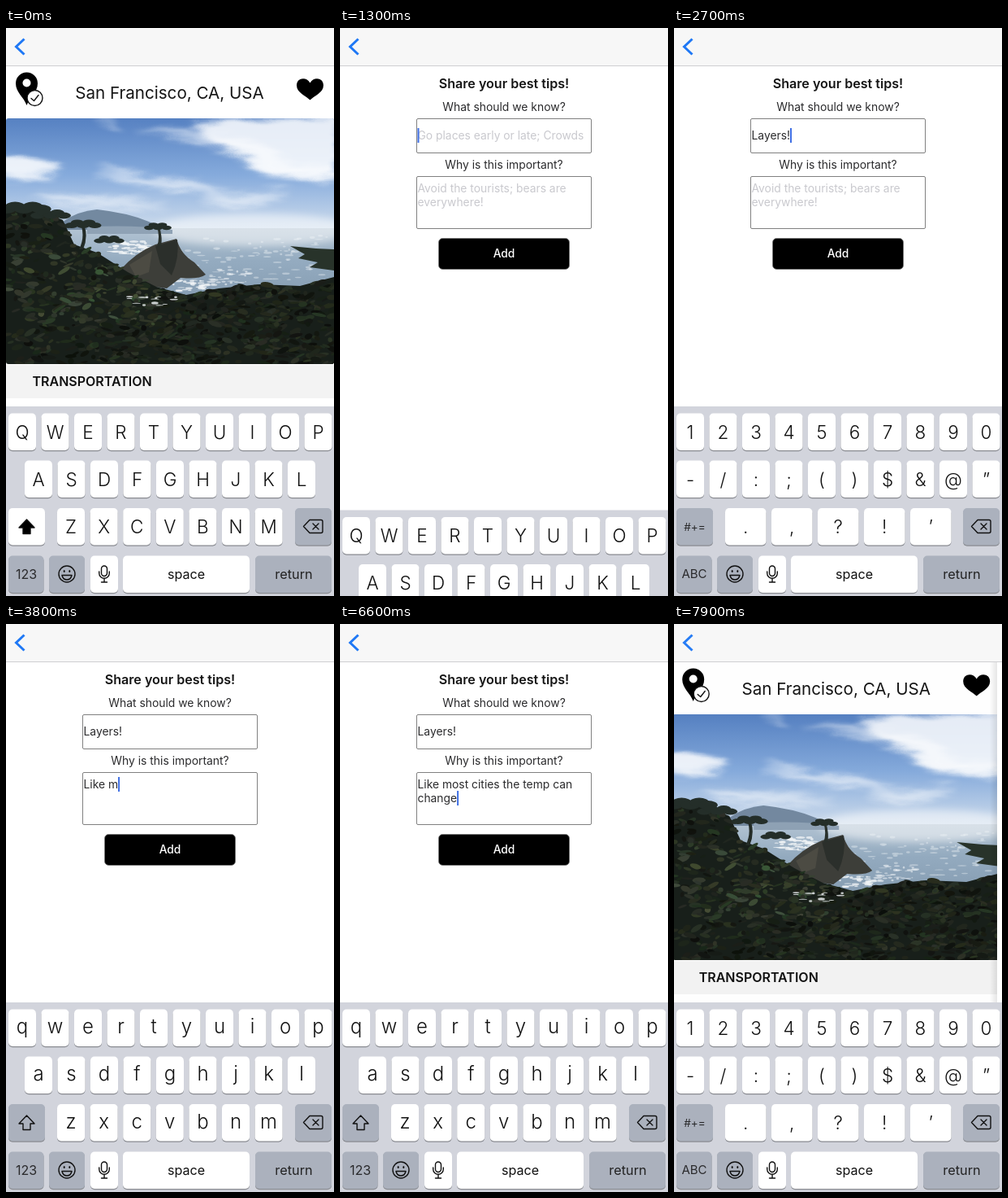
An HTML page for the animation above (8 s loop, 404 by 698 pixels).

```html
<!DOCTYPE html>
<html lang="en">
<head>
<meta charset="utf-8">
<title>Travel tips</title>
<style>
html, body { margin: 0; width: 100%; height: 100%; overflow: hidden; background: #fff; }
svg { display: block; }
text { font-family: Inter, Roboto, sans-serif; fill: #2b2b2d; white-space: pre; }
.mid { text-anchor: middle; }
.hint { fill: #c9c9ce; }
.key { fill: #111; font-weight: 300; }
.line { fill: none; stroke: #111; stroke-width: 1.4; stroke-linecap: round; stroke-linejoin: round; }
</style>
</head>
<body>
<svg id="stage" width="404" height="698" viewBox="0 0 404 698"></svg>
<script>
const LOOP = 8000;
const stage = document.getElementById('stage');

// ---------- drawing helpers ----------
const esc = s => s.replace(/&/g, '&amp;').replace(/</g, '&lt;');
const label = (x, y, size, s, attrs = '') =>
  `<text x="${x}" y="${y}" font-size="${size}" ${attrs}>${esc(s)}</text>`;
const centered = (x, y, size, s, attrs = '') => label(x, y, size, s, `text-anchor="middle" ${attrs}`);
const box = (x, y, w, h, fill, attrs = '') =>
  `<rect x="${x}" y="${y}" width="${w}" height="${h}" fill="${fill}" ${attrs}/>`;
const path = (d, fill, attrs = '') => `<path d="${d}" fill="${fill}" ${attrs}/>`;
const oval = (x, y, rx, ry, fill, attrs = '') =>
  `<ellipse cx="${x}" cy="${y}" rx="${rx}" ry="${ry}" fill="${fill}" ${attrs}/>`;
const gradient = (id, stops, attrs = 'x2="0" y2="1"') =>
  `<linearGradient id="${id}" ${attrs}>` + stops.map(([at, color, alpha = 1]) =>
    `<stop offset="${at}" stop-color="${color}" stop-opacity="${alpha}"/>`).join('') + '</linearGradient>';
const heart = (x, y, scale, attrs) =>
  `<path transform="translate(${x} ${y}) scale(${scale})" ${attrs}
    d="M0 13C-5 8-16.5 4-16.5-5C-16.5-15-4-16 0-8C4-16 16.5-15 16.5-5C16.5 4 5 8 0 13Z"/>`;

let seed = 11;
const random = () => (seed = (seed * 16807) % 2147483647) / 2147483647;
const between = (a, b) => a + (b - a) * random();

// ---------- coastal photo ----------
const ridge = [[0, 222], [42, 224], [70, 236], [84, 266], [112, 276], [150, 300],
  [185, 318], [222, 328], [262, 320], [312, 315], [362, 317], [404, 306]];

function ridgeY(x) {
  const i = Math.max(1, ridge.findIndex(p => p[0] >= x));
  const [a, b] = [ridge[i - 1], ridge[i]];
  return a[1] + (b[1] - a[1]) * (x - a[0]) / (b[0] - a[0]);
}

function foliage() {
  let out = '';
  for (let i = 0; i < 950; i++) {
    const x = between(0, 404), top = ridgeY(x);
    const y = top + random() * (413 - top);
    const sunny = x < 190 && y > 270 && y < 365 ? 10 : 0;
    const light = between(5, 18) + sunny * random();
    out += oval(x.toFixed(1), y.toFixed(1), between(2, 9).toFixed(1), between(1, 3.6).toFixed(1),
      `hsl(${between(75, 120) | 0} ${between(8, 24) | 0}% ${light.toFixed(1)}%)`,
      `transform="rotate(${between(-35, 25) | 0} ${x.toFixed(1)} ${y.toFixed(1)})"`);
  }
  return out;
}

function spray(n, x0, y0, x1, y1, alpha = .8) {
  let out = '';
  for (let i = 0; i < n; i++)
    out += oval(between(x0, x1), between(y0, y1), between(1, 6), between(.5, 1.6), '#f0f4f7', `opacity="${alpha}"`);
  return out;
}

const canopy = (x, y, w) => [0, 1, 2, 3, 4].map(i =>
  oval(x + (i - 2) * w / 5, y + (i % 2 ? -2 : 1.5), w / 4.5, w / 10, '#242e29')).join('');

const photo = () => `<g clip-path="url(#photoClip)">
  ${box(0, 111, 404, 140, 'url(#sky)')}
  <g fill="#fff" filter="url(#wisps)">
    <path d="M225 118C265 108 340 108 410 105V180C385 194 350 194 322 180C290 164 255 140 225 118Z" opacity=".85"/>
    <path d="M150 126Q250 118 320 150Q370 178 410 170V186Q350 192 295 162Q230 135 150 126Z" opacity=".55"/>
    <path d="M-10 157Q35 152 66 172Q60 184-10 183Z" opacity=".85"/>
    <path d="M105 174Q150 178 185 184Q235 190 275 203Q230 208 190 196Q140 190 105 174Z" opacity=".65"/>
    <path d="M30 208Q120 204 205 215Q120 224 60 218Z" opacity=".6"/>
    <path d="M240 212Q300 196 345 204Q320 220 260 220Z" opacity=".55"/>
    <path d="M110 113Q130 112 140 122Q125 124 110 113Z" opacity=".5"/>
  </g>
  ${box(0, 246, 404, 100, 'url(#sea)')}
  ${oval(305, 248, 125, 20, '#fff', 'opacity=".5" filter="url(#soft)"')}
  ${path('M70 238Q88 225 112 223Q150 227 176 238L198 248H70Z', '#7389a0')}
  ${path('M100 245Q150 241 205 248V253H100Z', '#8fa2b5')}
  ${spray(60, 128, 262, 176, 278)}${spray(35, 225, 297, 300, 316, .6)}${spray(90, 205, 255, 400, 310, .4)}
  ${spray(30, 205, 308, 250, 324)}
  ${path('M142 296Q160 276 184 266L210 259Q215 278 232 288L246 303Q238 309 215 307L198 320L150 314Z', '#3d3e39')}
  ${path('M184 268L211 260Q214 282 204 304L190 290Z', '#2b2f2b')}
  ${path('M152 291L180 274L176 300L160 306Z', '#4c4b43')}
  ${path('M186 268Q190 258 186 244L189 244Q193 258 191 268Z', '#29302b')}${canopy(187, 244, 27)}
  ${path('M' + ridge.map(p => p.join(' ')).join('L') + 'V413H0Z', '#181f1a')}
  ${foliage()}
  ${canopy(22, 221, 54)}${canopy(55, 229, 40)}
  ${path('M90 272Q97 258 93 244L97 244Q101 258 95 272Z', '#232b26')}${canopy(95, 241, 36)}${canopy(127, 260, 30)}
  ${spray(14, 150, 328, 210, 342)}
  ${path('M404 272L382 271L350 268L368 278L360 283L384 288L374 294L404 298Z', '#28332a')}
</g>`;

// ---------- pages ----------
const section = (y, s) => box(0, y, 404, 41, '#f3f3f3') +
  label(32.5, y + 26, 16, s, 'font-weight="600" style="fill:#111"');
const button = (x, y, w, s, fill) =>
  box(x, y, w, 38, fill, 'rx="5" stroke="#777" stroke-width=".8"') +
  centered(x + w / 2, y + 23.5, 13.8, s, 'font-weight="500" style="fill:#fff"');

const cityPage = () => `<g id="city">
  ${box(0, 47, 404, 600, '#fff')}
  ${path('M25.5 95C22 85 12 79 12 68A13.5 13.5 0 0 1 39 68C39 79 29 85 25.5 95Z', '#000')}
  ${oval(25.5, 67.5, 5, 5, '#fff')}
  ${oval(35.5, 86, 9.5, 9.5, '#fff', 'stroke="#111" stroke-width="1.4"')}
  <path class="line" d="M31 86.5L34.5 89.5L40 82.5"/>
  ${centered(201.5, 87, 20.6, 'San Francisco, CA, USA', 'style="fill:#161616"')}
  ${heart(374.5, 75.5, 1, 'fill="#000"')}
  ${photo()}
  ${section(414, 'TRANSPORTATION')}
  ${label(35, 476.5, 13.8, 'Great transportation!')}
  ${section(490, 'WHAT TO DO')}${section(531, 'GENERAL RECOMMENDATIONS')}
  ${button(24, 582.5, 172, 'Add To Do', '#000')}${button(207, 582.5, 172, 'Add Recommendation', '#4d4d4d')}
  <rect id="dim" y="47" width="404" height="600"/>
</g>`;

const field = (y, h) => box(94.5, y, 215, h, '#fff', 'rx="1.5" stroke="#808080"');
const formPage = () => `<g id="form">
  <rect id="edge" x="-9" y="47" width="9" height="600" fill="url(#edgeFade)"/>
  ${box(0, 47, 404, 600, '#fff')}
  ${centered(202, 73.5, 16.1, 'Share your best tips!', 'font-weight="600" style="fill:#151515"')}
  ${centered(202, 102, 13.9, 'What should we know?')}
  ${field(111.5, 42)}
  ${centered(202, 173, 13.9, 'Why is this important?')}
  ${field(182.5, 64)}
  <g id="hint0">${label(95.5, 137, 13.85, 'Go places early or late; Crowds', 'class="hint"')}</g>
  <g id="hint1">${label(95.5, 202, 13.85, 'Avoid the tourists; bears are', 'class="hint"')}
    ${label(95.5, 219, 13.85, 'everywhere!', 'class="hint"')}</g>
  ${[137, 202, 219].map((y, i) => label(95.5, y, 13.85, '', `id="row${i}"`)).join('')}
  <rect id="caret" width="2" height="18" fill="#3f6fe4"/>
  ${button(121.5, 258.5, 161, 'Add', '#000')}
</g>`;

const bars = () => `
  ${box(0, 0, 404, 47, '#f7f7f7')}${box(0, 46, 404, 1, '#cfcfd2')}
  <path id="back" d="M22.5 13.5L12.5 23L22.5 32.5" fill="none" stroke="#1f78f5" stroke-width="3"/>
  ${box(0, 645, 404, 53, '#f8f8f8')}${box(0, 645, 404, 1, '#c6c6c8')}
  <path d="M57 667L67 657L77 667M59.5 666V677.5H64.5V670H69.5V677.5H74.5V666M73.5 662V658H71.5" fill="none" stroke="#929292" stroke-width="1.3"/>
  ${oval(202, 663, 4.8, 6, '#2f7bf0')}
  ${path('M193.5 676Q193 672.5 199 670.5V666H205V670.5Q211 672.5 210.5 676Z', '#2f7bf0')}
  ${heart(336.5, 668, .72, 'fill="none" stroke="#999" stroke-width="1.5"')}
  ${centered(67, 695, 9.7, 'Main', 'style="fill:#909090"')}
  ${centered(202, 695, 9.7, 'Profile', 'style="fill:#2f7bf0"')}
  ${centered(337, 695, 9.7, 'Bucket List', 'style="fill:#909090"')}`;

// ---------- keyboard ----------
const GREY = '#abb1bd';
const keys = {};
const cap = (x, y, w, fill = '#fff') =>
  box(x, y + 1.3, w, 45.5, '#898b91', 'rx="5"') + box(x, y, w, 45.5, fill, 'rx="5"');

function keyRow(chars, x, y, pitch = 40.5, w = 34) {
  return [...chars].map((c, i) => {
    const kx = x + i * pitch;
    keys[c] = { x: kx, y, w };
    const lower = /[a-z]/.test(c);
    return cap(kx, y, w) + centered(kx + w / 2, y + (lower ? 29.5 : 31), lower ? 24 : 22.5, c, 'class="key"');
  }).join('');
}

const shiftKey = up => cap(3, 590, 45, up ? '#fff' : GREY) +
  `<path class="line" d="M25.5 604L35 614H30V621.5H21V614H16Z" ${up ? 'style="fill:#000"' : ''}/>`;

function layoutKeys(name) {
  if (name === 'symbols') return keyRow('1234567890', 3, 473.5) + keyRow('-/:;()$&@”', 3, 531.5) +
    cap(3, 590, 45, GREY) + centered(25.5, 618, 13.5, '#+=') + keyRow('.,?!’', 63, 590, 57, 50.5) +
    centered(25, 676, 15, 'ABC');
  const letters = ['qwertyuiop', 'asdfghjkl', 'zxcvbnm'].map(r => name === 'upper' ? r.toUpperCase() : r);
  return keyRow(letters[0], 3, 473.5) + keyRow(letters[1], 23, 531.5) + shiftKey(name === 'upper') +
    keyRow(letters[2], 63, 590, 40.6) + centered(25, 677, 16, '123');
}

const LAYOUTS = ['upper', 'lower', 'symbols'];
const keyboard = () => `<g id="keyboard">
  ${box(0, 465, 404, 233, '#d2d4dc')}
  ${cap(3, 648.5, 43.5, GREY)}${cap(53, 648.5, 44, GREY)}${cap(104, 648.5, 34)}
  ${cap(144, 648.5, 156)}${cap(307, 648.5, 94, GREY)}${cap(356, 590, 45, GREY)}
  ${LAYOUTS.map(n => `<g id="${n}">${layoutKeys(n)}</g>`).join('')}
  <circle class="line" cx="75" cy="671" r="10"/>
  ${oval(71.7, 667.5, 1, 1.6, '#111')}${oval(78.3, 667.5, 1, 1.6, '#111')}
  <path class="line" d="M69 672.5H81Q80 678 75 678Q70 678 69 672.5Z"/>
  <path class="line" d="M121 661A3.5 3.5 0 0 1 124.5 664.5V670A3.5 3.5 0 0 1 117.5 670V664.5A3.5 3.5 0 0 1 121 661ZM114.7 668V670A6.3 6.3 0 0 0 127.3 670V668M121 676.5V681M117.5 681H124.5"/>
  <path class="line" d="M366.5 612.5L374 604.5H388Q390 604.5 390 606.5V618.5Q390 620.5 388 620.5H374ZM378 609L385 616M385 609L378 616"/>
  ${centered(222, 676.5, 16.1, 'space', 'style="fill:#111"')}
  ${centered(354.5, 676.5, 16.3, 'return', 'style="fill:#222"')}
  <g id="popup"><path id="bubble" fill="#fff" filter="url(#drop)"/><text id="bubbleChar" class="key mid" font-size="40"></text></g>
</g>`;

stage.innerHTML = `<defs>
  ${gradient('sky', [[0, '#5681c2'], [.5, '#86abdc'], [1, '#d3e0ee']])}
  ${gradient('sea', [[0, '#b3c4d4'], [.4, '#94abc0'], [1, '#8299ae']])}
  ${gradient('edgeFade', [[0, '#000', 0], [1, '#000', .1]], 'x2="1" y2="0"')}
  <clipPath id="photoClip"><rect y="111" width="404" height="302" rx="3"/></clipPath>
  <filter id="soft" x="-20%" y="-60%" width="140%" height="220%"><feGaussianBlur stdDeviation="5"/></filter>
  <filter id="wisps" x="-10%" y="-20%" width="120%" height="140%">
    <feGaussianBlur stdDeviation="5" result="blur"/>
    <feTurbulence type="fractalNoise" baseFrequency=".015 .05" numOctaves="3" seed="4"/>
    <feDisplacementMap in="blur" scale="24" xChannelSelector="R" yChannelSelector="G"/>
  </filter>
  <filter id="drop" x="-20%" y="-20%" width="140%" height="140%"><feDropShadow dx="0" dy="1" stdDeviation="2.5" flood-opacity=".28"/></filter>
</defs>` + cityPage() + formPage() + bars() + keyboard();

const el = {};
stage.querySelectorAll('[id]').forEach(node => el[node.id] = node);
const show = (node, on) => node.setAttribute('display', on ? 'inline' : 'none');
const move = (node, x, y) => node.setAttribute('transform', `translate(${x} ${y})`);

// ---------- timeline ----------
// [field, text, first keystroke, gap]
const strokes = [
  [0, 'La', 1560, 90], [0, 'y', 1750, 0], [0, 'ers', 1930, 115], [0, '!', 2620, 0],
  [1, 'Like m', 3190, 106], [1, 'ost ', 3900, 90], [1, 'cities the t', 4384, 76],
  [1, 'emp can\nchange', 5350, 90], [1, '!', 6990, 0]
].flatMap(([target, text, start, gap]) =>
  [...text].map((char, i) => ({ target, char, at: start + i * gap })));
const layouts = [[0, 'upper'], [1600, 'lower'], [2350, 'symbols'], [2950, 'upper'], [3230, 'lower'], [6780, 'symbols']];
const FOCUS = [1250, 2950], ENTER = 452, LEAVE = 7500, SLIDE = 532;

const clamp = (v, a = 0, b = 1) => Math.min(b, Math.max(a, v));
const ease = u => 1 - Math.pow(1 - clamp(u), 3);

function drawPopup(t) {
  const press = strokes.filter(s => keys[s.char] && t >= s.at - 80 && t < s.at + 70).pop();
  show(el.popup, press);
  if (!press) return;
  const { x, y, w } = keys[press.char];
  const left = clamp(x + w / 2 - 31, 2, 340), top = y - 69, right = x + w;
  el.bubble.setAttribute('d', `M${left + 9} ${top}h44q9 0 9 9v45
    C${left + 62} ${top + 64} ${right} ${top + 60} ${right} ${top + 73}V${y + 41}q0 5-5 5H${x + 5}q-5 0-5-5
    V${top + 73}C${x} ${top + 60} ${left} ${top + 64} ${left} ${top + 54}V${top + 9}q0-9 9-9Z`);
  el.bubbleChar.setAttribute('x', left + 31);
  el.bubbleChar.setAttribute('y', top + (/[a-z]/.test(press.char) ? 43 : 46));
  el.bubbleChar.textContent = press.char;
}

function drawText(t) {
  const typed = strokes.filter(s => s.at <= t);
  const value = target => typed.filter(s => s.target === target).map(s => s.char).join('');
  const [first, second] = [value(0), value(1)];
  const rows = [first, ...second.split('\n')];
  for (let i = 0; i < 3; i++) el['row' + i].textContent = rows[i] || '';
  show(el.hint0, !first);
  show(el.hint1, !second);

  const active = t < FOCUS[1] ? 0 : rows.length - 1;
  const row = el['row' + active];
  const lastInput = Math.max(FOCUS[0], t >= FOCUS[1] ? FOCUS[1] : 0, ...typed.map(s => s.at));
  const lit = t - lastInput < 500 || (t - lastInput) % 1000 < 500;
  show(el.caret, t >= FOCUS[0] && t < LEAVE && lit);
  el.caret.setAttribute('x', 95.5 + (row.textContent ? row.getComputedTextLength() : 0));
  el.caret.setAttribute('y', row.getAttribute('y') - 14);
}

function draw(t) {
  const p = t < LEAVE ? ease((t - ENTER) / SLIDE) : 1 - ease((t - LEAVE) / SLIDE);
  move(el.city, -121 * p, 0);
  move(el.form, 404 * (1 - p), 0);
  el.dim.setAttribute('opacity', .15 * p);
  el.edge.setAttribute('opacity', p > 0 ? 1 : 0);
  el.back.setAttribute('opacity', Math.abs(2 * p - 1));

  const hidden = t < FOCUS[0] ? ease((t - 50) / 320) : 1 - ease((t - FOCUS[0]) / 280);
  move(el.keyboard, 0, 233 * hidden);
  const layout = layouts.filter(l => l[0] <= t).pop()[1];
  LAYOUTS.forEach(name => show(el[name], name === layout));
  drawPopup(t);
  drawText(t);
}

const start = performance.now();
function tick() {
  draw((performance.now() - start) % LOOP);
  requestAnimationFrame(tick);
}
tick();
</script>
</body>
</html>
```
